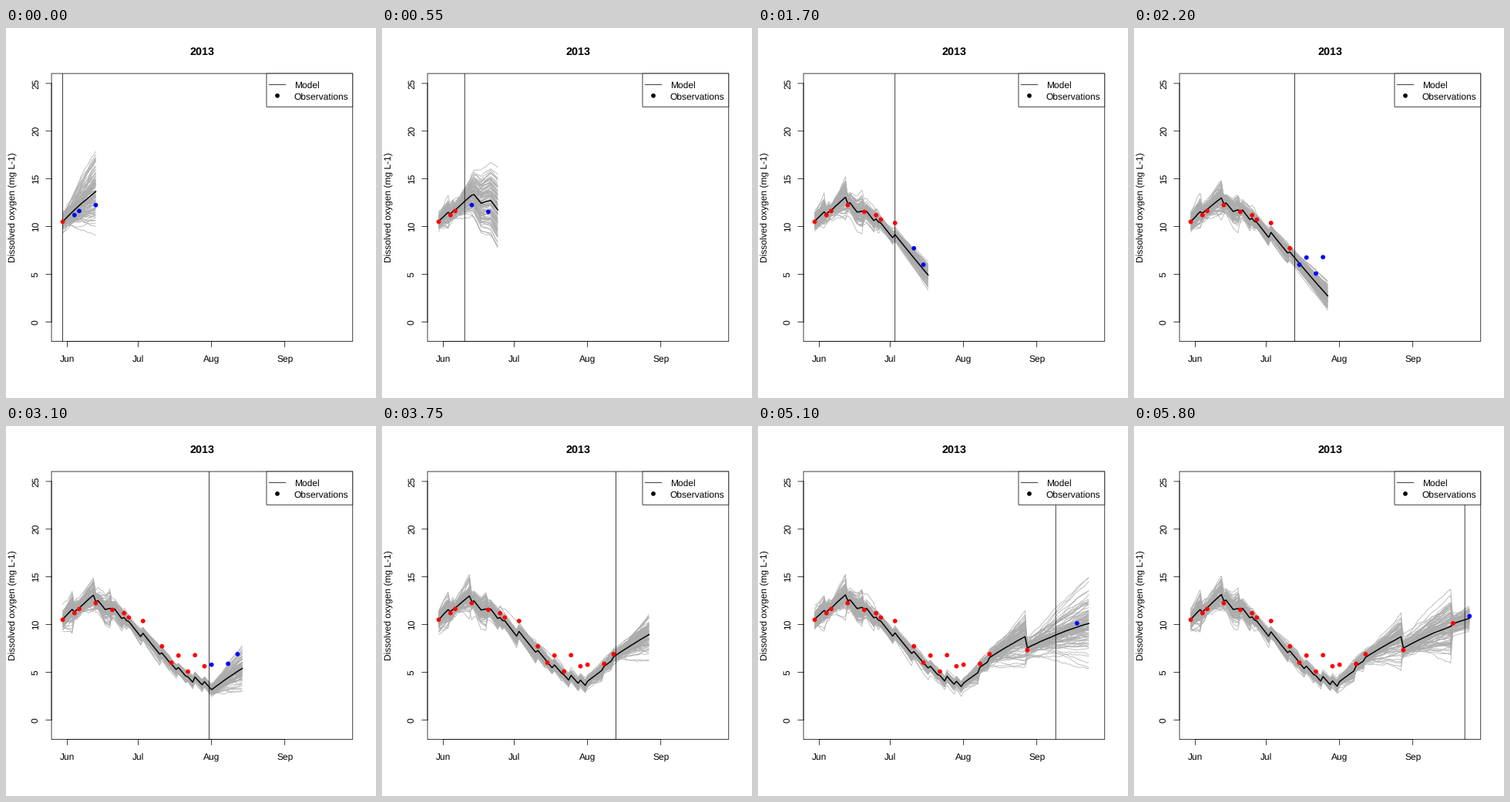
Animation of 480 by 480 pixels, one loop 5.85 s. Source, as a matplotlib script:

```python
import numpy as np
import matplotlib.pyplot as plt
from matplotlib.animation import FuncAnimation
from matplotlib.collections import LineCollection
from matplotlib.lines import Line2D
from matplotlib.patches import Circle, Rectangle

SIZE, FRAMES, STEP_MS = 480, 117, 50
LAST_DAY, HORIZON, MEMBERS = 118, 14, 100
OBS_SD = .5
L, R, T, B = 59.04, 449.76, 59.04, 406.56

# day since 30 May: observed oxygen
OBS = {0: 10.5, 5: 11.2, 7: 11.63, 14: 12.25, 21: 11.54, 26: 11.19, 28: 10.73,
       34: 10.37, 42: 7.72, 46: 6.0, 49: 6.75, 53: 5.07, 56: 6.79, 60: 5.63,
       63: 5.79, 70: 5.89, 74: 6.9, 90: 7.33, 111: 10.13, 118: 10.88}


def rate(day):
    """Mean daily change of oxygen."""
    if day < 14:
        return .26 - .004 * day
    if day < 22:
        return -.31 if 15 <= day < 18 else .06
    if day < 63:
        return -.33 + .0015 * (day - 22)
    return .19 - .0019 * (day - 63)


def spread(day):
    """How far members drift apart per day."""
    return np.interp(day, (0, 14, 28, 60, 66, 118), (.13, .11, .042, .035, .07, .06))


def run_model(today):
    """Ensemble Kalman filter up to today, then a free forecast."""
    rng = np.random.default_rng(2013 + today)

    def noise():
        return rng.normal(size=MEMBERS)

    end = min(today + HORIZON, LAST_DAY)
    state, bias = OBS[0] + OBS_SD * noise(), noise()
    runs = [state]
    for day in range(1, end + 1):
        state = state + rate(day - 1) + spread(day - 1) * (bias + noise())
        if day <= today and day in OBS:
            gain = state.var() / (state.var() + OBS_SD ** 2)
            state = state + gain * (OBS[day] + OBS_SD * noise() - state)
            bias = noise()
        runs.append(state)
    return np.arange(end + 1), np.array(runs).T


plt.rcParams["font.family"] = "Liberation Sans"
plt.rcParams["text.hinting"] = "none"
fig = plt.figure(figsize=(SIZE / 72, SIZE / 72), dpi=72, facecolor="white")
ax = fig.add_axes([L / SIZE, 1 - B / SIZE, (R - L) / SIZE, (B - T) / SIZE])
ax.set_xlim(-.04 * LAST_DAY, 1.04 * LAST_DAY)
ax.set_ylim(-2.04, 26.04)
ax.axis("off")

THIN = dict(lw=.75, snap=False)


def label(x, y, text, size=12, **kw):
    fig.text(x / SIZE, 1 - y / SIZE, text, fontsize=size, va="baseline",
             rotation_mode="anchor", **kw)


def line(x0, y0, x1, y1):
    fig.add_artist(Line2D([x0 / SIZE, x1 / SIZE], [1 - y0 / SIZE, 1 - y1 / SIZE],
                          color="black", zorder=4, **THIN))


def box(x0, y0, x1, y1, fill):
    fig.add_artist(Rectangle((x0 / SIZE, 1 - y1 / SIZE), (x1 - x0) / SIZE,
                             (y1 - y0) / SIZE, facecolor=fill, edgecolor="black",
                             zorder=3, **THIN))


def to_px(day, value):
    x, y = ax.transData.transform((day, value))
    return x, SIZE - y


box(L, T, R, B, "none")
line(L, to_px(0, 0)[1], L, to_px(0, 25)[1])
for value in range(0, 26, 5):
    y = to_px(0, value)[1]
    line(L - 7.2, y, L, y)
    label(41.8, y, str(value), ha="center", rotation=90)

line(to_px(2, 0)[0], B, to_px(94, 0)[0], B)
for day, month in ((2, "Jun"), (32, "Jul"), (63, "Aug"), (94, "Sep")):
    x = to_px(day, 0)[0]
    line(x, B, x, B + 7.2)
    label(x, 432.8, month, ha="center")

label(254.4, 35, "2013", 14.4, ha="center", weight="bold")
label(13, 233, "Dissolved oxygen (mg L-1)", ha="center", rotation=90)

# Legend
box(338, T, R, 102.24, "white")
line(341.2, 73.44, 362.8, 73.44)
fig.add_artist(Circle((352 / SIZE, 1 - 87.84 / SIZE), 2.9 / SIZE,
                      facecolor="black", lw=0, zorder=4))
label(373.6, 77.7, "Model", zorder=5)
label(373.6, 92.5, "Observations", zorder=5)

ensemble = ax.add_collection(LineCollection([], colors="#acacac", linewidths=.75, zorder=1))
mean_line, = ax.plot([], [], color="black", lw=1.5, zorder=2)
now_line = ax.axvline(0, color="black", zorder=3, **THIN)
dots = ax.scatter([], [], s=5.8 ** 2, linewidths=0, zorder=4)


def update(today):
    days, runs = run_model(today)
    ensemble.set_segments([np.column_stack((days, run)) for run in runs])
    mean_line.set_data(days, runs.mean(axis=0))
    now_line.set_xdata([today, today])
    shown = [(day, value) for day, value in OBS.items() if day <= days[-1]]
    dots.set_offsets(shown)
    dots.set_facecolor(["red" if day <= today else "blue" for day, _ in shown])
    return ensemble, mean_line, now_line, dots


anim = FuncAnimation(fig, update, frames=FRAMES, interval=STEP_MS,
                     repeat=True, repeat_delay=0, blit=False)
plt.show()
```
